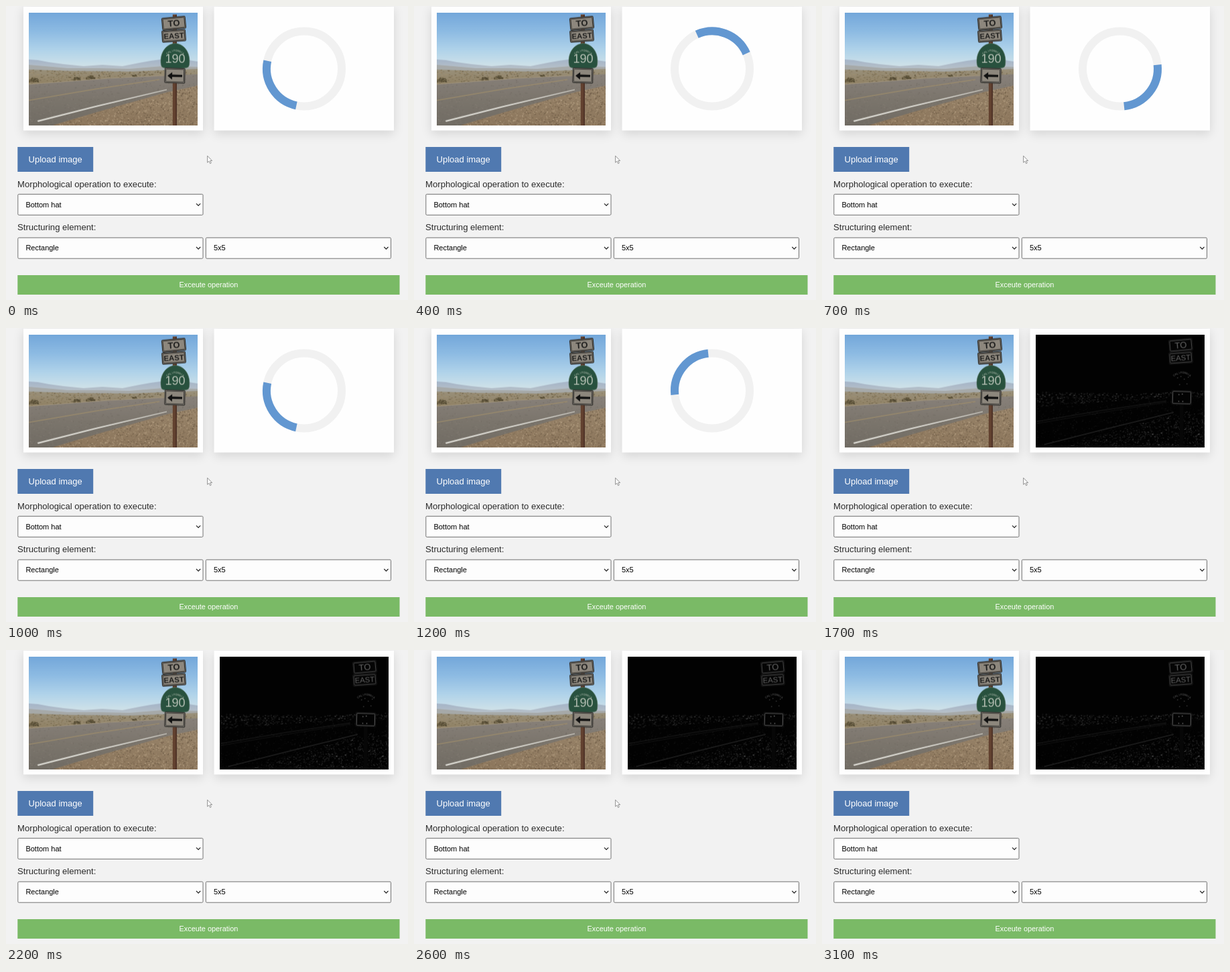
Animation, 600 px wide and 438 px high, one loop 3200 ms. Source, as an HTML page with a canvas:

```html
<!DOCTYPE html>
<html lang="en">
<head>
<meta charset="utf-8">
<title>Morphological operations</title>
<style>
  html, body { margin: 0; width: 100%; height: 100%; overflow: hidden; background: #f2f2f2; }
  canvas, svg { position: absolute; left: 0; top: 0; width: 600px; height: 438px; }
  text { font-family: "Liberation Sans", Arial, sans-serif; }
  .label { font-size: 13.1px; fill: #2a2a2a; }
  .option { font-size: 11px; fill: #000; }
  .box { fill: #fdfdfd; stroke: #727272; }
  .chevron { fill: none; stroke: #222; stroke-width: 1.2; }
</style>
</head>
<body>
<canvas id="stage" width="600" height="438"></canvas>
<svg viewBox="0 0 600 438">
  <rect x="17.3" y="210" width="112.9" height="37" fill="#5079b0"/>
  <text x="33.6" y="233" font-size="13" fill="#fff">Upload image</text>

  <text class="label" x="17.1" y="269.7">Morphological operation to execute:</text>
  <rect class="box" x="17.8" y="280.4" width="276.2" height="31" rx="1.5"/>
  <text class="option" x="29.4" y="300">Bottom hat</text>
  <path class="chevron" d="M284 294.4l3.1 3.1 3.1-3.1"/>

  <text class="label" x="17.1" y="334.2">Structuring element:</text>
  <rect class="box" x="17.8" y="345.2" width="276.2" height="31" rx="1.5"/>
  <text class="option" x="29.4" y="364">Rectangle</text>
  <path class="chevron" d="M284 359l3.1 3.1 3.1-3.1"/>
  <rect class="box" x="298.3" y="345.2" width="276.2" height="31" rx="1.5"/>
  <text class="option" x="310" y="364">5x5</text>
  <path class="chevron" d="M564.3 359l3.1 3.1 3.1-3.1"/>

  <rect x="17.3" y="401" width="570.2" height="29" fill="#7aba66"/>
  <text x="302.4" y="419" font-size="10.9" fill="#fff" text-anchor="middle">Exceute operation</text>

  <path id="cursor" d="M300.6 223.2v10l2.3-2 1.7 3.5 1.7-.8-1.6-3.4h3z"
        fill="#fafafa" stroke="#8a8a8a" stroke-width=".9"/>
</svg>
<script>
const LOOP = 3200, STEP = 100, RESULT_AT = 1300, CURSOR_OFF = 3100;
const FONT = '"Liberation Sans", Arial, sans-serif';
const ctx = document.getElementById('stage').getContext('2d');
const cursor = document.getElementById('cursor');

// Both pictures share these coordinates.
const W = 252, H = 168;
const ROAD = [0, 107, 120, 98, 202, 94, 252, 92, 252, 113, 206, 121, 110, 147, 40, 168, 0, 168];
const GRAVEL = [36, 168, 110, 146, 206, 119, 252, 109, 252, 168];
const PLAIN = [0, 85, 60, 87, 150, 88, 252, 84, 252, 94, 202, 95, 120, 99, 0, 108];

function seeded(seed) {
  return () => {
    seed = (seed * 1664525 + 1013904223) >>> 0;
    return seed / 4294967296;
  };
}

function layer(paint) {
  const c = document.createElement('canvas');
  c.width = W;
  c.height = H;
  paint(c.getContext('2d'));
  return c;
}

function trace(g, pts) {
  g.beginPath();
  for (let i = 0; i < pts.length; i += 2) g.lineTo(pts[i], pts[i + 1]);
}

function poly(g, pts, fill) {
  trace(g, pts);
  g.closePath();
  g.fillStyle = fill;
  g.fill();
}

function line(g, pts, color, width) {
  trace(g, pts);
  g.strokeStyle = color;
  g.lineWidth = width;
  g.stroke();
}

function vertical(g, y0, y1, ...colors) {
  const grad = g.createLinearGradient(0, y0, 0, y1);
  colors.forEach((c, i) => grad.addColorStop(i / (colors.length - 1), c));
  return grad;
}

// Scatters small specks inside a polygon.
function specks(g, area, [x, y, w, h], count, size, colors, seed) {
  const rnd = seeded(seed);
  g.save();
  trace(g, area);
  g.clip();
  for (let i = 0; i < count; i++) {
    g.fillStyle = colors[Math.floor(rnd() * colors.length)];
    g.fillRect(x + rnd() * w, y + rnd() * h, size * (0.6 + rnd()), size * (0.4 + rnd() * 0.5));
  }
  g.restore();
}

function words(g, str, x, y, size, color, weight = 'bold') {
  g.font = `${weight} ${size}px ${FONT}`;
  g.textAlign = 'center';
  g.textBaseline = 'middle';
  g.fillStyle = color;
  g.fillText(str, x, y);
}

function plate(g, x, y, w, h, tilt, look, inside) {
  g.save();
  g.translate(x, y);
  g.rotate(tilt);
  g.beginPath();
  g.roundRect(-w / 2, -h / 2, w, h, 2);
  g.fillStyle = look.rim;
  g.fill();
  g.beginPath();
  g.roundRect(-w / 2 + 1, -h / 2 + 1, w - 2, h - 2, 1.5);
  g.fillStyle = look.face;
  g.fill();
  g.beginPath();
  g.roundRect(-w / 2 + 2, -h / 2 + 2, w - 4, h - 4, 1);
  g.strokeStyle = look.ink;
  g.lineWidth = look.edge;
  g.stroke();
  inside();
  g.restore();
}

function textSigns(g, look) {
  plate(g, 216.5, 16, 36, 19, -0.09, look, () => words(g, 'TO', 0, 0.8, 13, look.ink, look.weight));
  plate(g, 216.5, 34.8, 36, 18, -0.07, look, () => words(g, 'EAST', 0, 0.8, 11.3, look.ink, look.weight));
}

function arch(g, str, cx, cy, r, spread, size, color) {
  [...str].forEach((ch, i) => {
    g.save();
    g.translate(cx, cy);
    g.rotate((i / (str.length - 1) - 0.5) * spread);
    words(g, ch, 0, -r, size, color);
    g.restore();
  });
}

function shield(g) {
  g.beginPath();
  g.moveTo(218.5, 46);
  g.bezierCurveTo(233, 47, 242, 61, 239.5, 78);
  g.quadraticCurveTo(239, 82, 235, 82.5);
  g.quadraticCurveTo(218.5, 85.5, 202, 82.5);
  g.quadraticCurveTo(198, 82, 197.5, 78);
  g.bezierCurveTo(195, 61, 204, 47, 218.5, 46);
  g.fillStyle = '#28513e';
  g.fill();
  g.strokeStyle = '#57735f';
  g.lineWidth = 0.6;
  g.stroke();
  arch(g, 'CALIFORNIA', 218.5, 75, 18, 1.4, 4.2, '#8a9e8e');
  words(g, '190', 218.5, 70, 18, '#b3beb2', 'normal');
}

function arrow(g, color) {
  poly(g, [-11, 0.5, -4, -5, -4, -1.3, 11, -1.3, 11, 2, -4, 2, -4, 6], color);
}

function bush(g, x, y, r, seed) {
  const rnd = seeded(seed);
  for (let i = 0; i < r * 9; i++) {
    const a = rnd() * Math.PI, d = Math.sqrt(rnd()) * r;
    g.fillStyle = ['#554b34', '#665b40', '#463f2c', '#73674a'][i % 4];
    g.fillRect(x + Math.cos(a) * d, y - Math.sin(a) * d, 1.5, 1.3);
  }
}

const photo = layer(g => {
  g.fillStyle = vertical(g, 0, 84, '#73a7da', '#8dbbe3', '#b0d3ea', '#d5e4e8');
  g.fillRect(0, 0, W, H);

  poly(g, [0, 70, 14, 71, 30, 74, 52, 77, 82, 80, 110, 78, 140, 80, 165, 75, 182, 72,
    197, 70, 215, 74, 232, 70, 252, 73, 252, 92, 0, 92], vertical(g, 70, 88, '#a5b5c9', '#bcc4c8'));
  poly(g, [0, 78, 24, 80, 58, 83, 104, 83, 150, 84, 200, 80, 252, 81, 252, 92, 0, 92], '#a6a9a8');
  poly(g, PLAIN, vertical(g, 84, 108, '#9a917c', '#8f8062'));
  specks(g, PLAIN, [0, 85, W, 24], 750, 1.6,
    ['#776a4e', '#a09072', '#857758', '#655940', '#95866a'], 7);
  bush(g, 92, 100, 7, 3);
  bush(g, 71, 101, 6, 5);
  bush(g, 7, 103, 7, 9);
  bush(g, 157, 96, 4, 11);

  poly(g, ROAD, vertical(g, 92, 168, '#88817a', '#7b756c', '#716c64'));
  specks(g, ROAD, [0, 92, W, 76], 1000, 1.3, ['#7e776f', '#716b63', '#857e75'], 21);
  line(g, [0, 107, 120, 98, 202, 94], '#a89a80', 0.8);
  line(g, [0, 131, 100, 114, 195, 100], '#a3906b', 1.1);

  poly(g, GRAVEL, vertical(g, 108, 168, '#98846a', '#8c765c'));
  specks(g, GRAVEL, [36, 108, 216, 60], 2200, 1.5,
    ['#7d6a52', '#a59074', '#6c5a45', '#988266', '#b5a084'], 33);
  poly(g, [13, 161, 100, 139, 206, 114.4, 206, 115.5, 100, 141, 14, 163], '#e0dfd8');

  g.fillStyle = '#62412f';
  g.fillRect(214.8, 3, 6, H);
  g.fillStyle = '#4a3026';
  g.fillRect(219.3, 3, 1.5, H);

  const look = { rim: '#2d2c2a', face: '#8d877d', ink: '#20201f', edge: 0.8 };
  textSigns(g, look);
  shield(g);
  plate(g, 218, 94, 31, 23, 0.03, look, () => arrow(g, '#111'));
});

const bottomHat = layer(g => {
  g.fillStyle = '#020202';
  g.fillRect(0, 0, W, H);

  specks(g, PLAIN, [0, 84, W, 25], 850, 1.5, ['#1d1d1d', '#303030', '#121212', '#444'], 41);
  specks(g, ROAD, [0, 94, W, 74], 1100, 1.2, ['#121212', '#1c1c1c', '#0b0b0b'], 43);
  specks(g, GRAVEL, [36, 108, 216, 60], 1700, 1.3, ['#161616', '#282828', '#3a3a3a', '#1e1e1e'], 47);
  specks(g, GRAVEL, [36, 108, 216, 60], 60, 1.3, ['#666', '#7a7a7a'], 53);
  line(g, [0, 130, 100, 113, 195, 99], '#202020', 0.9);
  line(g, [0, 133, 100, 116, 195, 101], '#191919', 0.8);
  line(g, [13, 164, 100, 142, 206, 116], '#3c3c3c', 0.8);

  g.fillStyle = '#070707';
  g.fillRect(214.8, 104, 6, H - 104);

  textSigns(g, { rim: '#161616', face: '#050505', ink: '#646464', edge: 0.7, weight: 'normal' });
  arch(g, 'CALIFORNIA', 218.5, 75, 18, 1.4, 4.2, '#484848');
  g.fillStyle = '#404040';
  for (const [x, y] of [[211, 64], [216, 62], [221, 66], [227, 63], [214, 74], [225, 73]])
    g.fillRect(x, y, 1.6, 1.2);
  plate(g, 218, 94, 31, 22, 0.03, { rim: '#111', face: '#030303', ink: '#707070', edge: 0.8 }, () => {
    g.fillStyle = '#777';
    for (const [x, y] of [[-5, -5], [0, -6], [-5, 5], [1, 5]]) g.fillRect(x, y, 1.4, 1.4);
  });
});

function card(x, w) {
  ctx.save();
  ctx.shadowColor = 'rgba(0,0,0,.13)';
  ctx.shadowBlur = 15;
  ctx.shadowOffsetY = 4;
  ctx.fillStyle = '#fefefe';
  ctx.fillRect(x, 1, w, 184.5);
  ctx.restore();
}

function ring(from, sweep, color) {
  ctx.beginPath();
  ctx.arc(445, 93.5, 56, from, from + sweep);
  ctx.strokeStyle = color;
  ctx.lineWidth = 12;
  ctx.stroke();
}

function draw(t) {
  ctx.fillStyle = '#f2f2f2';
  ctx.fillRect(0, 0, 600, 438);
  card(26, 268);
  card(310.5, 268.5);
  ctx.drawImage(photo, 33.7, 9.6, W + 0.3, H);
  if (t < RESULT_AT) {
    const turn = Math.PI * 2;
    ring(0, turn, '#f1f1f1');
    ring((102 / 360 + t / 1000) * turn, turn / 4, '#6297d1');
  } else {
    ctx.drawImage(bottomHat, 318.6, 9.6, W + 0.3, H);
  }
  cursor.style.visibility = t < CURSOR_OFF ? 'visible' : 'hidden';
}

const start = performance.now();
function tick() {
  const t = (performance.now() - start) % LOOP;
  draw(Math.floor(t / STEP) * STEP);
  requestAnimationFrame(tick);
}
tick();
</script>
</body>
</html>
```
